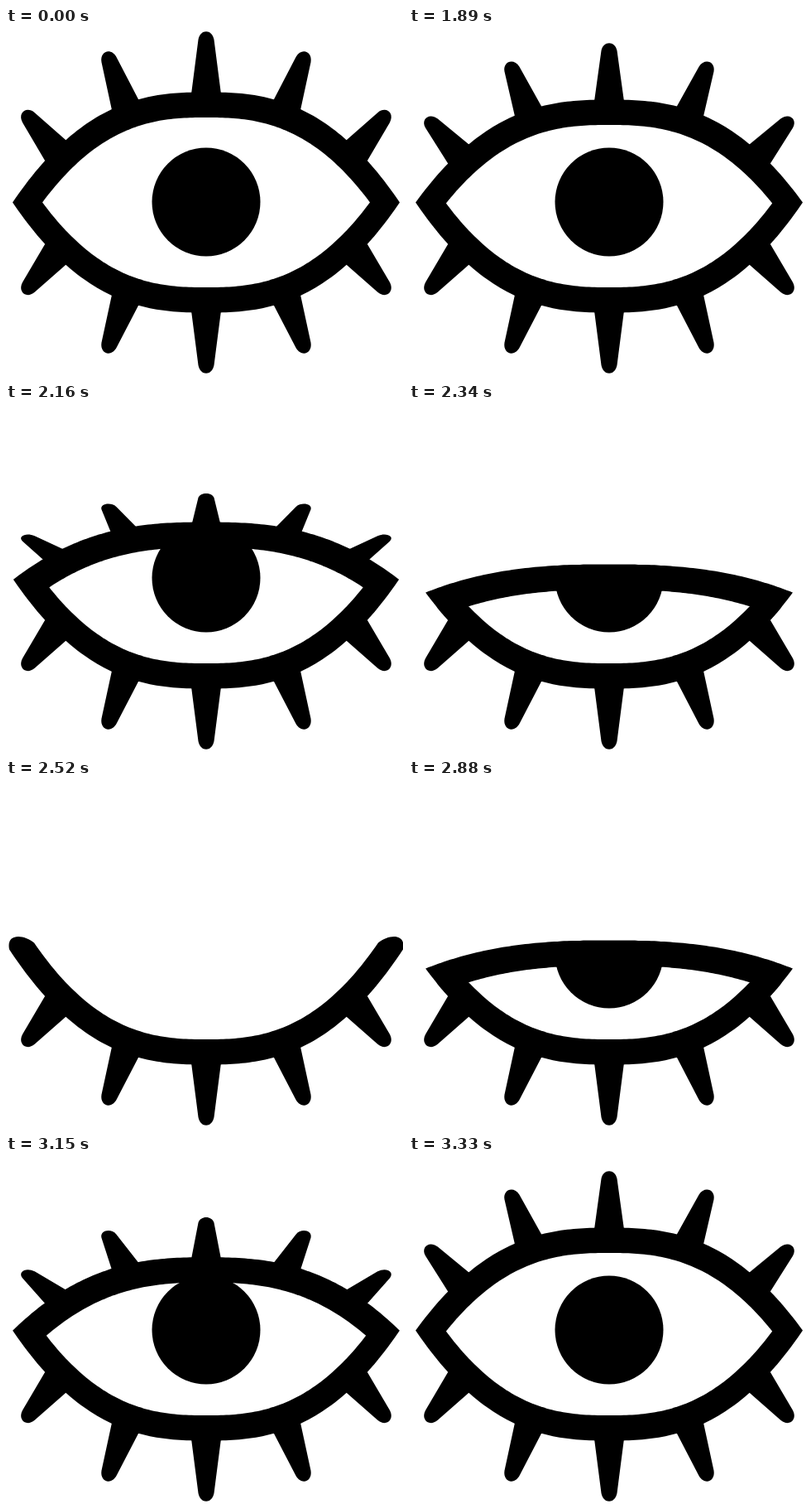
An HTML page with a canvas for the animation above (3.42 s loop, 480 by 420 pixels).

```html
<!DOCTYPE html>
<html lang="en">
<head>
<meta charset="utf-8">
<title>Blinking eye</title>
<style>
  html, body { margin: 0; width: 100%; height: 100%; overflow: hidden; background: #fff; }
  canvas { display: block; }
</style>
</head>
<body>
<canvas id="stage" width="480" height="420"></canvas>
<script>
const ctx = document.getElementById('stage').getContext('2d');
const LOOP = 3420, STEP = 90, CLOSE_START = 1890, OPEN_START = 2790, CLOSED = 8;
const UP = -1, DOWN = 1, FAR = 9000;

// All shapes are relative to the centre of the eye
const CENTRE = [242, 210.5];
const OUTER = { halfWidth: 234, height: 133 };
const INNER = { halfWidth: 198, height: 102.5 };
const THICKNESS = OUTER.height - INNER.height;

// Base and tip of the lashes in one quarter; the rest are mirrored
const LASHES = [[0, 133, 0, 206.5], [97, 115.5, 121, 182], [183, 64, 221, 110]];

// Points of a lid edge from x = -reach to x = reach
function arch({ halfWidth, height }, side, reach = halfWidth) {
  return Array.from({ length: 121 }, (_, i) => {
    const x = reach * (i / 60 - 1);
    return [x, side * height * (1 - Math.abs(x / halfWidth) ** 2.6)];
  });
}

// The area on the far side of an edge, closed with straight sides
function areaBeyond(edge, farY) {
  const path = new Path2D();
  edge.forEach(p => path.lineTo(...p));
  path.lineTo(edge.at(-1)[0], farY);
  path.lineTo(edge[0][0], farY);
  path.closePath();
  return path;
}

function closedLid() {
  const path = new Path2D();
  const outer = arch(OUTER, DOWN, 238), inner = arch(INNER, DOWN, 208).reverse();
  outer.forEach(p => path.lineTo(...p));
  path.bezierCurveTo(242, -25, 222, -25, ...inner[0]);
  inner.forEach(p => path.lineTo(...p));
  path.bezierCurveTo(-222, -25, -242, -25, ...outer[0]);
  return path;
}

function lashRow(side) {
  const path = new Path2D();
  for (const mirror of [-1, 1]) {
    for (const [baseX, baseY, tipX, tipY] of LASHES) {
      const length = Math.hypot(tipX - baseX, tipY - baseY);
      const dx = mirror * (tipX - baseX) / length, dy = side * (tipY - baseY) / length;
      const at = (along, across) => [
        mirror * baseX + dx * along - dy * across,
        side * baseY + dy * along + dx * across
      ];
      path.moveTo(...at(-10, -19));
      path.lineTo(...at(length - 10, -9.5));
      path.bezierCurveTo(...at(length + 3, -7), ...at(length + 3, 7), ...at(length - 10, 9.5));
      path.lineTo(...at(-10, 19));
      path.closePath();
    }
  }
  return path;
}

const belowLid = areaBeyond(arch(OUTER, UP), FAR);
const belowLidInner = areaBeyond(arch(INNER, UP), FAR);
const aboveRim = areaBeyond(arch(OUTER, DOWN, 240), -FAR);
const aboveRimInner = areaBeyond(arch(INNER, DOWN, 208), -FAR);
const closed = closedLid();
const upperLashes = lashRow(UP), lowerLashes = lashRow(DOWN);
const pupil = new Path2D();
pupil.arc(0, -.5, 65.5, 0, 2 * Math.PI);

// Runs paint with shapes flattened towards the middle and moved down
function squashed(scale, shift, paint) {
  const before = ctx.getTransform();
  ctx.transform(1, 0, 0, scale, 0, shift);
  paint();
  ctx.setTransform(before);
}

function drawOpenEye(step) {
  const scale = Math.exp(-.07 * step ** 1.6);
  const drop = 22 * (step / 6) ** 6;
  const innerDrop = drop + THICKNESS * (1 - scale);

  ctx.save();
  ctx.clip(aboveRim);
  squashed(scale, 3 * drop, () => ctx.fill(upperLashes));
  squashed(scale, drop, () => {
    ctx.fill(belowLid);
    ctx.clip(belowLid);
  });

  ctx.save();
  ctx.clip(aboveRimInner);
  ctx.fillStyle = '#fff';
  squashed(scale, innerDrop, () => ctx.fill(belowLidInner));
  ctx.restore();

  ctx.fill(pupil);
  ctx.restore();
}

function stepAt(time) {
  if (time < CLOSE_START) return 0;
  if (time < OPEN_START) return Math.min(CLOSED, 1 + Math.floor((time - CLOSE_START) / STEP));
  return CLOSED - 1 - Math.floor((time - OPEN_START) / STEP);
}

function draw(time) {
  const step = stepAt(time % LOOP);
  ctx.resetTransform();
  ctx.clearRect(0, 0, 480, 420);
  ctx.translate(...CENTRE);
  ctx.fillStyle = '#000';
  if (step === CLOSED) ctx.fill(closed);
  else drawOpenEye(step);
  ctx.fill(lowerLashes);
}

const start = performance.now();
function tick() {
  draw(performance.now() - start);
  requestAnimationFrame(tick);
}
tick();
</script>
</body>
</html>
```
